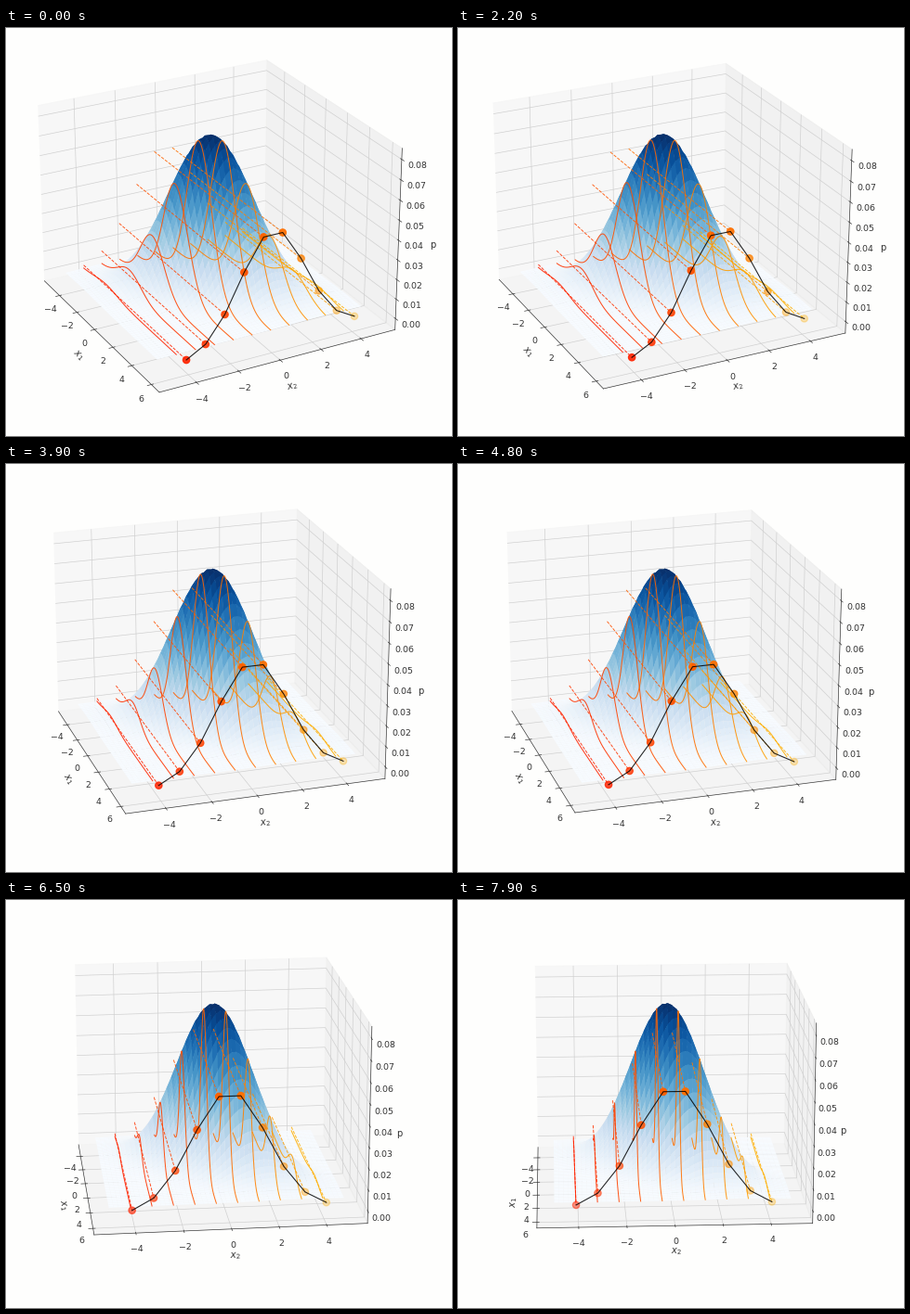
These frames come from a looping animation (480 by 440 pixels, 8000 ms). A matplotlib script:

```python
import numpy as np
import matplotlib.pyplot as plt
from matplotlib.animation import FuncAnimation

WIDTH, HEIGHT, DPI = 480, 440, 60
FRAMES, INTERVAL = 80, 100

# Key poses of the hand-turned box: frame, turn and tilt in degrees.
POSES = np.array([
    (0, 28.3, 25.4), (30, 25.0, 23.8), (38, 23.8, 23.4),
    (39, 17.7, 21.2), (54, 16.3, 20.8), (55, 13.6, 20.0),
    (57, 13.5, 20.0), (63, 7.1, 18.0), (79, 3.0, 15.5),
])

# Correlated normal distribution with equal variances.
VAR, COV = 2.5, 1.5
DET = VAR ** 2 - COV ** 2
REACH = 5
WALL = 6
INK = "#333333"


def density(x1, x2):
    q = (VAR * x1 ** 2 - 2 * COV * x1 * x2 + VAR * x2 ** 2) / DET
    return np.exp(-q / 2) / (2 * np.pi * np.sqrt(DET))


def marginal(x2):
    """Marginal of x2, scaled to 0.7 of the density's peak."""
    return 0.7 * density(0, 0) * np.exp(-x2 ** 2 / (2 * VAR))


def padded(low, high):
    """Limits with the usual margin and the extra rim of the panes."""
    pad = (high - low) * (0.05 + 1.1 / 48)
    return low - pad, high + pad


plt.rcParams.update({
    "font.family": "DejaVu Sans", "font.size": 12,
    "xtick.labelsize": 11.3, "ytick.labelsize": 11.3,
    "grid.color": "#cfcfcf", "text.color": INK, "axes.labelcolor": INK,
    "xtick.color": INK, "ytick.color": INK, "axes.edgecolor": INK,
})
fig = plt.figure(figsize=(WIDTH / DPI, HEIGHT / DPI), dpi=DPI, facecolor="#fefefd")
side = 441
ax = fig.add_axes([-0.5 / WIDTH, 9.4 / HEIGHT, side / WIDTH, side / HEIGHT],
                  projection="3d", computed_zorder=False)
ax.patch.set_visible(False)

grid = np.linspace(-REACH, REACH, 51)
g1, g2 = np.meshgrid(grid, grid)
ax.plot_surface(g1, g2, density(g1, g2), cmap="Blues", rcount=51, ccount=51, zorder=1)

cuts = np.linspace(-REACH, REACH, 12)[1:-1]
heights = marginal(cuts)
walls = np.full_like(cuts, WALL)
colors = plt.cm.autumn(np.linspace(0.14, 0.68, len(cuts)))
along = np.linspace(-REACH, REACH, 100)
for x2, p, color in zip(cuts, heights, colors):
    ax.plot(along, np.full_like(along, x2), density(along, x2),
            color=color, lw=1.2, alpha=0.9, zorder=4)
    ax.plot([-REACH, WALL], [x2, x2], [p, p], "--",
            color=color, lw=1.1, alpha=0.9, zorder=4)

ax.scatter(walls, cuts, heights, c=colors, s=78, linewidths=1.5, zorder=3)
ax.plot(walls, cuts, heights, color="black", lw=1.3, alpha=0.85, zorder=5)

ax.set_xlim(padded(-REACH, WALL))
ax.set_ylim(padded(-REACH, REACH))
ax.set_zlim(padded(0, density(0, 0)))
ax.set_xticks(range(-4, 7, 2))
ax.set_yticks(range(-4, 5, 2))
ax.set_zticks(np.arange(9) / 100)
ax.set_xlabel("$x_1$")
ax.set_ylabel("$x_2$")
ax.set_zlabel("p")
for axis in (ax.xaxis, ax.yaxis, ax.zaxis):
    axis.line.set_color(INK)


def update(frame):
    turn, tilt = (np.interp(frame, POSES[:, 0], POSES[:, k]) for k in (1, 2))
    ax.view_init(elev=tilt, azim=-turn)
    return []


anim = FuncAnimation(fig, update, frames=FRAMES, interval=INTERVAL,
                     init_func=lambda: update(0), repeat=True, repeat_delay=0)
plt.show()
```
